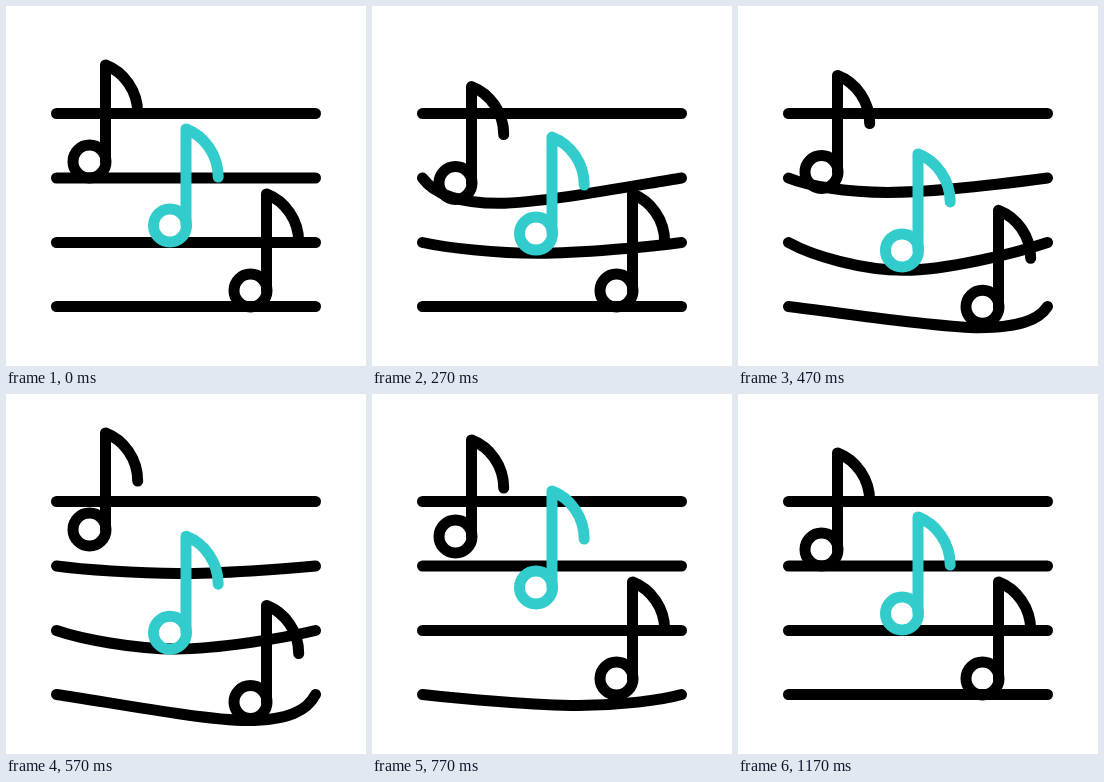
Animation of 360x360 px, one loop 1670 ms. Source, as an HTML page:

```html
<!DOCTYPE html>
<html lang="en">
<head>
<meta charset="utf-8">
<title>Notes on a stave</title>
<style>
  html, body { margin: 0; width: 100%; height: 100%; overflow: hidden; background: #fff; }
  svg { display: block; width: 100%; height: 100%; }
  path, circle { fill: none; stroke-width: 11; stroke-linecap: round; stroke-linejoin: round; }
</style>
</head>
<body>
<svg id="stage" viewBox="0 0 360 360"></svg>
<script>
const LOOP = 1670, LAST = 35;
const LEFT = 50.5, RIGHT = 309.5, MIDDLE = 180;
const stage = document.getElementById('stage');

// Heights at every second step, starting at step 1
const bounce = [0, 3.5, 13, 19, 23.5, 25, 19.2, 0, -20, -26, -22.4, -13, -3.3, 0];
const sagging = [0.5, 5, 17, 24, 26, 28, 18.5, 11, 7.5, 0];

const strings = [
  { y: 107.5 },
  { y: 172, x: 127, delay: 0 },
  { y: 236.5, x: 166, delay: 4 },
  { y: 300.5, x: 241, delay: 8 }
];
const notes = [
  { x: 0, y: 0, delay: 0, color: '#000' },
  { x: 80.5, y: 64, delay: 4, color: '#33cccc' },
  { x: 161, y: 129, delay: 8, color: '#000' }
];

function add(parent, tag, attrs) {
  const el = document.createElementNS('http://www.w3.org/2000/svg', tag);
  for (const key in attrs) el.setAttribute(key, attrs[key]);
  return parent.appendChild(el);
}

// Smooth curve through evenly spaced values
function sample(list, step) {
  const pos = (step - 1) / 2;
  if (pos <= -0.5) return 0;
  const i = Math.floor(pos), u = pos - i;
  const at = k => (k < 0 || k >= list.length ? 0 : list[k]);
  const a = at(i - 1), b = at(i), c = at(i + 1), d = at(i + 2);
  return b + u / 2 * (c - a + u * (2 * a - 5 * b + 4 * c - d + u * (3 * (b - c) + d - a)));
}

// The short side of a pulled string leaves its end more steeply
function stringPath(y, x, sag) {
  const low = y + sag;
  const reach = w => 0.33 * w - 14.4;
  const drop = w => y + sag * (0.8 - 0.0028 * w);
  const l = x - LEFT, r = RIGHT - x;
  return `M${LEFT} ${y}C${LEFT + reach(l)} ${drop(l)} ${x - 42} ${low} ${x} ${low}` +
    `C${x + 42} ${low} ${RIGHT - reach(r)} ${drop(r)} ${RIGHT} ${y}`;
}

for (const s of strings) {
  s.el = add(stage, 'path', { d: `M${LEFT} ${s.y}H${RIGHT}`, stroke: '#000' });
}
for (const n of notes) {
  n.el = add(stage, 'g', { stroke: n.color });
  add(n.el, 'circle', { cx: 83.5, cy: 155.5, r: 16.5 });
  add(n.el, 'path', { d: 'M99.5 155.5V59C118 66 131.7 85 131.7 107' });
}

function draw(time) {
  const step = Math.min(LAST, Math.floor(time % LOOP * 0.03 + 0.15));
  for (const s of strings) {
    if (s.delay === undefined) continue;
    const k = step - s.delay;
    const sag = Math.max(0, sample(sagging, k));
    const back = Math.min(1, Math.max(0, (k - 11) / 7));
    s.el.setAttribute('d', sag
      ? stringPath(s.y, s.x + (MIDDLE - s.x) * back, sag)
      : `M${LEFT} ${s.y}H${RIGHT}`);
  }
  for (const n of notes) {
    const y = n.y + sample(bounce, step - n.delay);
    n.el.setAttribute('transform', `translate(${n.x} ${y})`);
  }
}

const start = performance.now();
function tick() {
  draw(performance.now() - start);
  requestAnimationFrame(tick);
}
draw(0);
requestAnimationFrame(tick);
</script>
</body>
</html>
```
